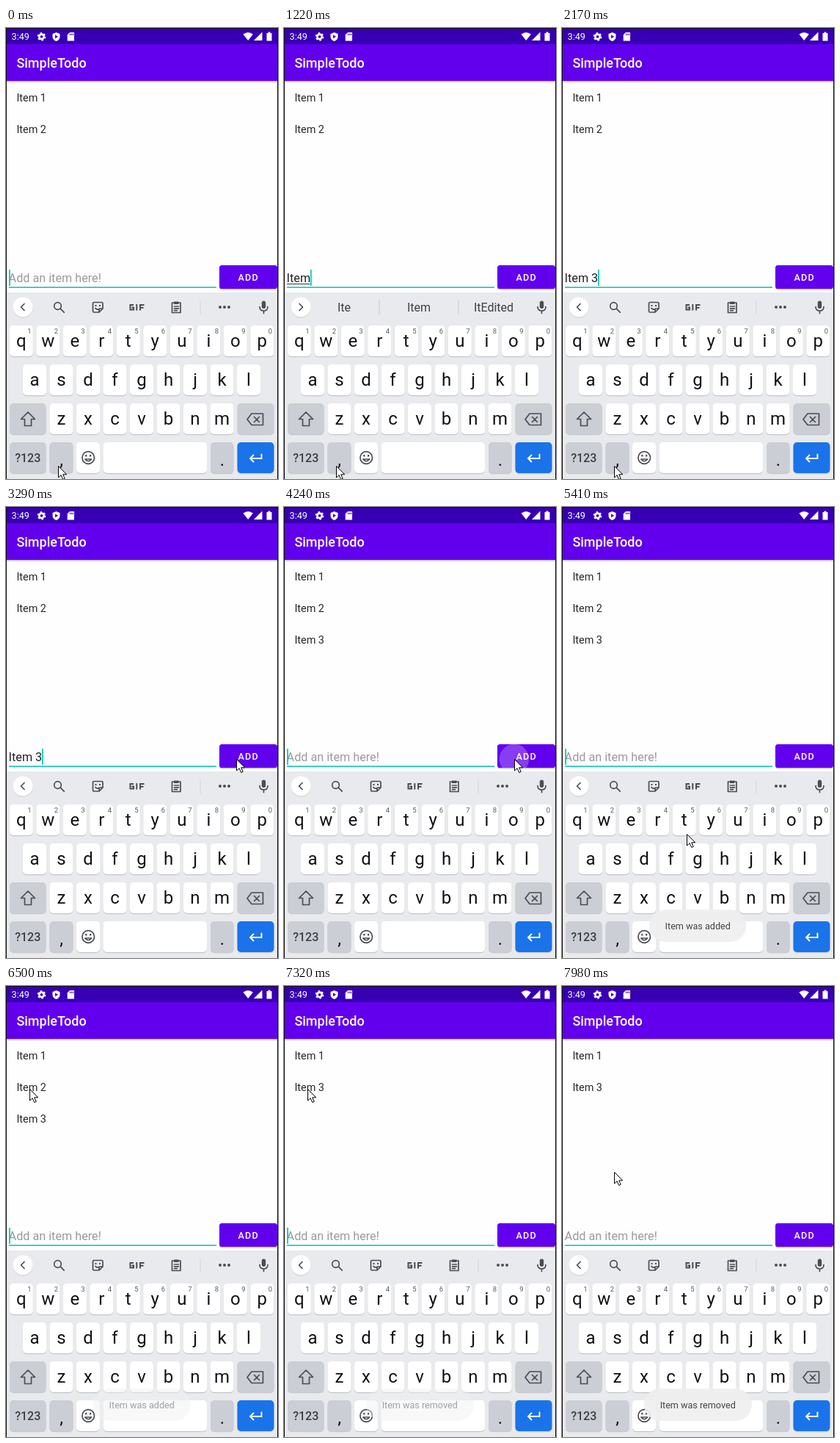
An HTML page for the animation above (8 s loop, 371x614 px).

```html
<!DOCTYPE html>
<html lang="en">
<head>
<meta charset="utf-8">
<title>Todo list demo</title>
<style>
html, body { margin: 0; width: 100%; height: 100%; overflow: hidden; background: #fefefe; }
svg { display: block; width: 371px; height: 614px; font-family: Roboto, "Noto Sans", sans-serif; }
text { white-space: pre; }
.mid { text-anchor: middle; }
.item { font-size: 14.4px; fill: #262626; }
.field { font-size: 16.2px; }
.word { font-size: 16px; fill: #3c4043; text-anchor: middle; }
.letter { font-size: 24px; fill: #101114; text-anchor: middle; }
.digit { font-size: 9.5px; fill: #55585d; text-anchor: middle; }
.line { fill: none; stroke: #4a4d52; stroke-width: 1.7; stroke-linejoin: round; stroke-linecap: round; }
</style>
</head>
<body>
<svg viewBox="0 0 371 614">
  <defs>
    <linearGradient id="shade" x2="0" y2="1">
      <stop stop-color="#000" stop-opacity=".25"/>
      <stop offset="1" stop-color="#000" stop-opacity="0"/>
    </linearGradient>
    <clipPath id="buttonClip"><rect x="291" y="323" width="79" height="32" rx="3.6"/></clipPath>
  </defs>
  <rect width="371" height="614" fill="#fefefe"/>

  <!-- status bar and title -->
  <rect y="1" width="371" height="21" fill="#3700b3"/>
  <rect y="22" width="371" height="50" fill="#6200ee"/>
  <rect y="72" width="371" height="3" fill="url(#shade)"/>
  <g fill="#fff">
    <text x="7.6" y="16.4" font-size="12.6">3:49</text>
    <circle cx="48.5" cy="11.8" r="3.2" fill="none" stroke="#fff" stroke-width="2.6"/>
    <circle cx="48.5" cy="11.8" r="5" fill="none" stroke="#fff" stroke-width="1.6" stroke-dasharray="2.6 2.636"/>
    <path d="M68.5 6l5 2v4q0 4-5 6-5-2-5-6V8z"/>
    <path d="M67 9.2v5l4-2.5z" fill="#3700b3"/>
    <path d="M87 6h5q1.300 1.300 1.300v9q0 1.300-1.300 1.300h-7q-1.300 0-1.300-1.300V9.500z" display="none"/>
    <path d="M87 6h6v11.500h-9.300V9.300z"/>
    <path d="M87.500 7.500v2.500m2-2.500v2.500m2-2.500v2.500" stroke="#3700b3"/>
    <path d="M323.500 8.500q6.700-5 13.400 0L330.200 17z"/>
    <path d="M349.500 5.500V17H338z"/>
    <path d="M355.500 7h2V5.500h3V7h2v10.500h-7z"/>
    <text x="14.4" y="54.300" font-size="18" font-weight="500">SimpleTodo</text>
  </g>

  <g id="items"></g>

  <!-- entry field and button -->
  <rect x="4" y="352.300" width="283" height="1.700" fill="#1cc8b8"/>
  <text id="hint" class="field" x="3.600" y="346.400" fill="#9a9a9a">Add an item here!</text>
  <text id="entry" class="field" x="3.600" y="346.400" fill="#202020"></text>
  <rect id="compose" x="4" y="348" height="1" fill="#303030"/>
  <rect id="caret" y="329" width="1.800" height="22" fill="#03cdb9"/>
  <rect x="291" y="324.500" width="79" height="32" rx="4" fill="#000" opacity=".22"/>
  <rect x="291" y="323" width="79" height="32" rx="3.600" fill="#6200ee"/>
  <circle id="ripple" cx="314" cy="343" fill="#fff" clip-path="url(#buttonClip)"/>
  <text x="316.600" y="343.700" font-size="12.600" font-weight="500" letter-spacing="1.120" fill="#fff">ADD</text>

  <!-- keyboard -->
  <rect y="360" width="371" height="254" fill="#e8eaed"/>
  <circle cx="23" cy="381" r="13.500" fill="#c9cbce"/>
  <circle cx="23" cy="380" r="13.500" fill="#fff"/>
  <path id="chevron" class="line"/>
  <g id="tools">
    <circle class="line" cx="70.500" cy="378.500" r="4.800"/>
    <path class="line" d="M74.200 382.200l5 5" stroke-width="2"/>
    <path class="line" d="M120 373.500h10.500q1.500 0 1.500 1.500v7l-5 5h-7q-1.500 0-1.500-1.500V375q0-1.500 1.500-1.500zM132 382h-3.500q-1.500 0-1.500 1.500v3.500M122 381.500q2 2.800 5 1"/>
    <path d="M121.500 377h2v2h-2zm5.500 0h2v2h-2z" fill="#4a4d52"/>
    <path d="M174 377h-4.500v6.500h4.500V380.500h-2.500M178.300 376v8.500M183 384.500V377h5.500M183 380.700h4.500" fill="none" stroke="#4a4d52" stroke-width="2"/>
    <path class="line" d="M226.500 374h11.500v13.500h-11.500zM229.500 379h6m-6 2.800h6m-6 2.800h4"/>
    <path d="M229 372.500h6.500v3.500H229z" fill="#4a4d52"/>
    <path d="M265 371v19" stroke="#d2d4d8"/>
    <path d="M292 380h.01m6 0h.01m6 0h.01" stroke="#4a4d52" stroke-width="4" stroke-linecap="round"/>
  </g>
  <g id="words">
    <path d="M130 370v20.500M238 370v20.500" stroke="#c6c8cc"/>
    <text class="word" x="82" y="386"></text>
    <text class="word" x="184" y="386"></text>
    <text class="word" x="286" y="386"></text>
  </g>
  <rect x="348.800" y="371.500" width="5.400" height="10.500" rx="2.700" fill="#4a4d52"/>
  <path class="line" d="M346 379.500q0 5.500 5.500 5.500t5.500-5.500M351.500 385v3.500"/>
  <g id="keys"></g>
  <path class="line" d="M30 523l9.500 9.500h-5v9h-9v-9h-5z" stroke-linejoin="miter"/>
  <path class="line" d="M335 525h15.500v15.500H335l-6-7.750zM338.500 529.500l7 7m0-7l-7 7"/>
  <circle class="line" cx="112.200" cy="585" r="8.300"/>
  <path class="line" d="M107.800 587q4.400 5.500 8.800 0z"/>
  <path d="M108.200 581h2.200v2.400h-2.200zm5.800 0h2.200v2.400H114z" fill="#4a4d52"/>
  <path class="line" d="M348.500 580.500v5.500H333m4.500-4.500l-4.500 4.500 4.500 4.500" style="stroke:#fff;stroke-width:1.900;stroke-linejoin:miter"/>

  <g id="toast">
    <rect y="548" height="44" rx="22" fill="#efefef" opacity=".92"/>
    <text class="mid" x="185.200" y="575" font-size="12.600" fill="#444"></text>
  </g>
  <path d="M.5 0V614M370.500 0V614M0 .5H371" stroke="#101010"/>
  <path id="mouse" d="M.5 .5v15.500l3.600-3.300 2.600 5.800 2.500-1.100-2.500-5.600h5z" fill="#fff" stroke="#000"/>
</svg>
<script>
const LOOP = 8000, STEP = 135;
const $ = id => document.getElementById(id);
const between = (t, a, b) => t >= a && t < b;
const show = (el, on) => el.setAttribute("visibility", on ? "visible" : "hidden");
const set = (el, attrs) => { for (const k in attrs) el.setAttribute(k, attrs[k]); };

// Progress from a to b, advancing at the recording's coarse frame rate
function ramp(t, a, b) {
  const n = Math.max(1, Math.round((b - a) / STEP));
  return Math.min(1, Math.max(0, Math.floor(n * (t - a) / (b - a) + 1e-6) / n));
}
const smooth = u => u * u * (3 - 2 * u);

// time, text, suggestions (none means the toolbar), composing
const typing = [
  [0, ""],
  [550, "I", ["I", "I'm", "It"], true],
  [700, "It", ["It", "It's", "Its"], true],
  [900, "Ite", ["Ite", "Item", "Items"], true],
  [1090, "Item", ["Ite", "Item", "ItEdited"], true],
  [1500, "Item ", ["is", "in", "and"]],
  [2050, "Item 3"],
  [4240, ""]
];
const caretOff = [[150, 550], [2450, 2870], [3570, 3970], [4640, 5170], [5680, 6230], [6770, 7170], [7575, 8000]];

// start, end, from, to
const moves = [
  [2310, 3290, 71, 596, 314, 343],
  [4240, 4510, 314, 343, 303, 343],
  [4510, 5170, 303, 343, 195, 501],
  [5170, 5680, 195, 501, 32, 142],
  [5825, 5960, 32, 142, 32, 140],
  [7440, 7980, 32, 140, 71, 253]
];

function buildKeys() {
  let out = "";
  const key = (x, y, w, fill = "#fff") =>
    out += `<rect x="${x}" y="${y + 1.2}" width="${w}" height="42" rx="5" fill="#c4c7cb"/>` +
           `<rect x="${x}" y="${y}" width="${w}" height="42" rx="5" fill="${fill}"/>`;
  const label = (cls, x, y, s) => out += `<text class="${cls}" x="${x}" y="${y}">${s}</text>`;
  [["qwertyuiop", 4.8, 405], ["asdfghjkl", 23, 458], ["zxcvbnm", 59.5, 511]].forEach(([row, x0, y]) =>
    [...row].forEach((c, i) => {
      const x = x0 + 36.5 * i;
      key(x, y, 32);
      label("letter", x + 16, y + 29, c);
      if (y === 405) label("digit", x + 27, y + 11, (i + 1) % 10);
    }));
  const grey = "#cbced4";
  key(5, 511, 49.5, grey);
  key(315.5, 511, 50, grey);
  key(5, 564, 49.5, grey);
  key(59.5, 564, 32, grey);
  key(96, 564, 32);
  key(132.5, 564, 141.5);
  key(279, 564, 31.5, grey);
  key(315.5, 564, 50, "#1a73e8");
  label("letter", 75.7, 596, ",");
  label("letter", 294.8, 596, ".");
  out += `<text class="mid" x="29.7" y="591" font-size="16" font-weight="500" fill="#3c4043">?123</text>`;
  $("keys").innerHTML = out;
}

function drawItems(t) {
  const names = t < 4240 ? [1, 2] : t < 7170 ? [1, 2, 3] : [1, 3];
  $("items").innerHTML = names.map((n, i) =>
    `<text class="item" x="14.4" y="${99.6 + 43 * i}">Item ${n}</text>`).join("");
}

function drawEntry(t) {
  const [, text, words, composing] = typing.filter(s => s[0] <= t).pop();
  const entry = $("entry");
  entry.textContent = text;
  const width = text ? entry.getComputedTextLength() : 0;
  show($("hint"), !text);
  show($("compose"), composing);
  set($("compose"), { width: Math.max(0, width - 1) });
  set($("caret"), { x: text ? 3.4 + width : 4 });
  show($("caret"), !caretOff.some(([a, b]) => between(t, a, b)));
  show($("tools"), !words);
  show($("words"), words);
  $("words").querySelectorAll("text").forEach((el, i) => el.textContent = words ? words[i] : "");
  set($("chevron"), { d: words ? "M21 375.5l4.500 4.500-4.500 4.500" : "M25 375.5l-4.500 4.500 4.500 4.500" });
}

function drawToast(t) {
  const removed = t >= 7170;
  const alpha = removed ? ramp(t, 7170, 7440) : ramp(t, 4240, 4510) - ramp(t, 6230, 6770);
  const [box, text] = $("toast").children;
  set($("toast"), { opacity: alpha });
  set(box, removed ? { x: 112, width: 147 } : { x: 119, width: 132.5 });
  text.textContent = removed ? "Item was removed" : "Item was added";
}

function drawMouse(t) {
  let x = 71, y = 596;
  for (const [a, b, x0, y0, x1, y1] of moves) {
    if (t < a) break;
    const u = smooth(ramp(t, a, b));
    x = x0 + (x1 - x0) * u;
    y = y0 + (y1 - y0) * u;
  }
  set($("mouse"), { transform: `translate(${Math.round(x)} ${Math.round(y)})` });
}

function draw(t) {
  drawItems(t);
  drawEntry(t);
  drawToast(t);
  drawMouse(t);
  const r = (t - 4240) / 260;
  set($("ripple"), { r: between(r, 0, 1) ? 20 + 60 * r : 0, opacity: between(r, 0, 1) ? 0.24 * (1 - r) : 0 });
}

buildKeys();
const start = performance.now();
function tick() {
  draw((performance.now() - start) % LOOP);
  requestAnimationFrame(tick);
}
tick();
</script>
</body>
</html>
```
